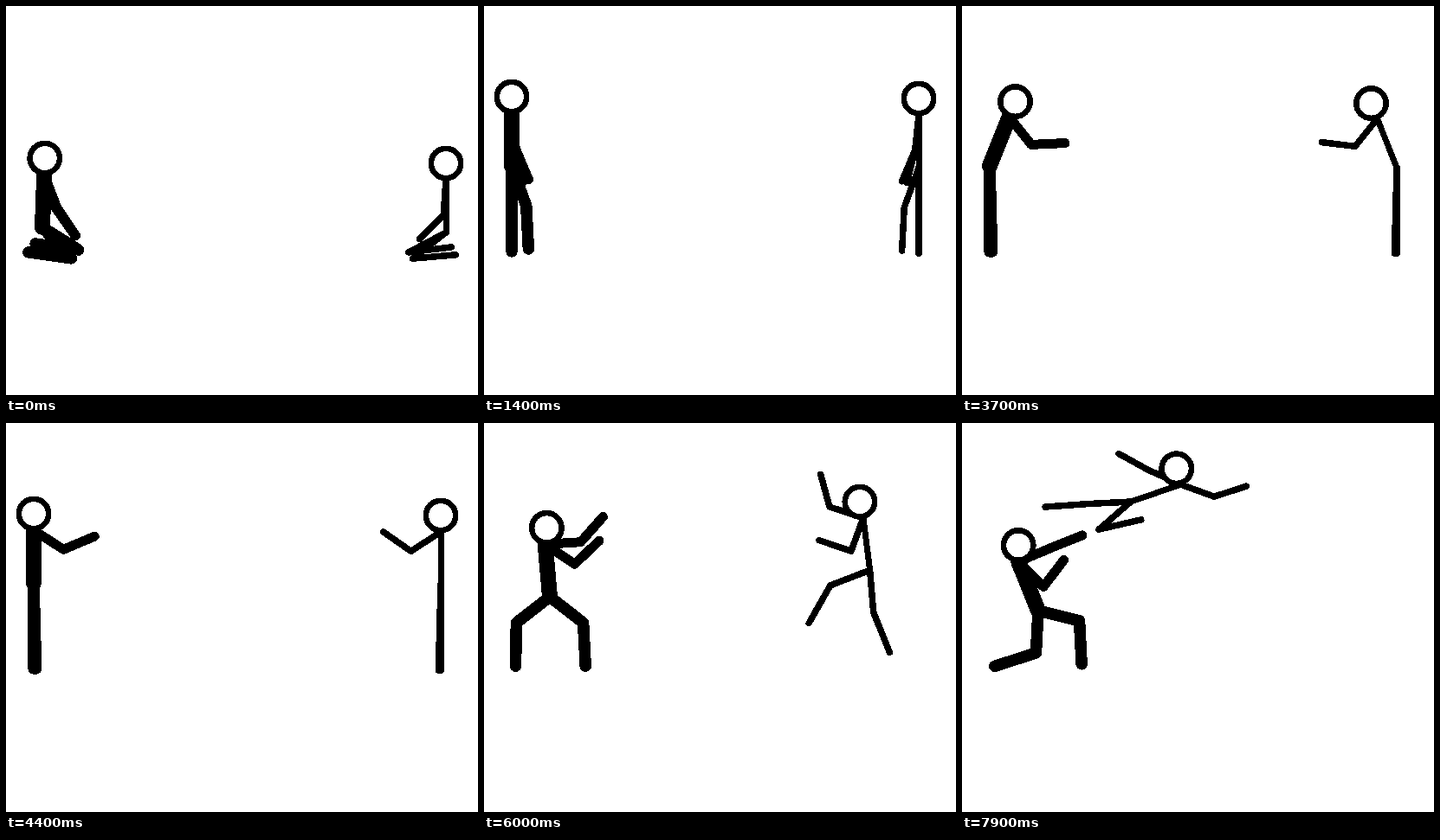
An HTML page that plays this animation: 545x450 px, repeating every 8000 ms.

```html
<!DOCTYPE html>
<html lang="en">
<head>
<meta charset="utf-8">
<title>Stick fight</title>
<style>
  html, body { margin: 0; width: 100%; height: 100%; overflow: hidden; background: #fff; }
  svg { display: block; width: 545px; height: 450px; }
  path { fill: none; stroke: #000; stroke-linecap: round; stroke-linejoin: round; }
  circle { fill: #fff; stroke: #000; stroke-width: 6.6; }
</style>
</head>
<body>
<svg id="stage" viewBox="0 0 545 450" shape-rendering="crispEdges"></svg>
<script>
const LOOP = 8000, STEP = 100;
const HEAD = 19, TORSO = 61, ARM = [41, 39], LEG = [49, 50];
const TOGETHER = [0, 0, 1.5, 1.5];

// Angles in degrees, positive towards the opponent. Limbs hang at 0;
// lean and tilt (torso and head) stand up at 0. hip is the shift from home.
function pose({ hip = [0, 0], lean = 0, tilt = lean, arms, legs = TOGETHER }) {
  const both = arms.length > 2 ? arms : [...arms, ...arms];
  return [...hip, lean, tilt, ...both, ...legs];
}

// Kneeling, rising and bowing are the same ritual for both fighters.
function ritual(kneel, reach) {
  return [
    [0, pose(kneel)],
    [900, pose({ hip: [2, 48], arms: [14, 30], legs: [6, -87, 77, -5] })],
    [1400, pose({ arms: [6, 23, 6, 14], legs: [0, 0, 20, 3] })],
    [1800, pose({ arms: [6, 18] })],
    [2300, pose(reach)],
    [2900, pose({ lean: 21, tilt: 24, arms: [45, 91] })],
    [3300, pose({ lean: 34, arms: [28, 81] })],
    [4400, pose(reach)],
    [4600, pose(reach)]
  ];
}

const stance = { hip: [44, 16], arms: [89, 126, 51, 120], legs: [-52, -1, 52, 3] };
const lunge = { hip: [56, 32], lean: -22, tilt: 0, legs: [-3, -72, 76, 3] };
const guard = { arms: [115, 168, 17, 108], legs: [0, 0, 14, -2] };

const fighters = [
  {
    home: [32, 185], dir: 1, widths: [18, 11, 13.5],
    keys: [
      ...ritual(
        { hip: [10, 71], lean: 2, arms: [19, 35, 21, 34], legs: [43, -98, 58, -98] },
        { arms: [57, 113] }),
      [4900, pose(stance)],
      [5200, pose(stance)],
      [6800, pose({ ...stance, lean: -10, tilt: 10, arms: [98, 151, 61, 147] })],
      [7700, pose({ ...lunge, arms: [-58, -29, 48, 144] })],
      [7900, pose({ ...lunge, arms: [113, 112, 45, 143] })]
    ]
  },
  {
    home: [502, 187], dir: -1, widths: [7, 7.5, 7.5],
    keys: [
      ...ritual(
        { hip: [-6, 75], arms: [4, 45], legs: [52, -95, 62, -97] },
        { arms: [57, 125] }),
      [4900, pose(guard)],
      [5000, pose(guard)],
      [5200, pose({ hip: [13, 0], lean: 9, tilt: 15, arms: [101, 166, 13, 108], legs: [-4, -10, 59, 8] })],
      [5900, pose({ hip: [42, -11], lean: 13, arms: [102, 168, 15, 106], legs: [-16, -19, 66, 22] })],
      [6400, pose({ hip: [114, -40], lean: -16, tilt: 9, arms: [132, 152, 40, 120], legs: [40, -34, 80, 60] })],
      [6800, pose({ hip: [188, -73], lean: -64, tilt: 6, arms: [108, 111, 55, 130], legs: [81, -46, 93, 90] })],
      [7900, pose({ hip: [307, -96], lean: -71, tilt: 15, arms: [114, 119, -70, -108], legs: [49, -103, 87, 86] })]
    ]
  }
];

const stage = document.getElementById('stage');

function add(tag, attrs) {
  const el = document.createElementNS('http://www.w3.org/2000/svg', tag);
  for (const name in attrs) el.setAttribute(name, attrs[name]);
  return stage.appendChild(el);
}

function sample(keys, t) {
  const i = keys.findIndex(([time]) => time > t);
  if (i < 0) return keys[keys.length - 1][1];
  const [t0, a] = keys[i - 1], [t1, b] = keys[i];
  return a.map((v, j) => v + (b[j] - v) * (t - t0) / (t1 - t0));
}

function makeFighter({ home, dir, widths: [torsoW, armW, legW], keys }) {
  const line = w => add('path', { 'stroke-width': w });
  const legs = [line(legW), line(legW)];
  const torso = line(torsoW);
  const arms = [line(armW), line(armW)];
  const head = add('circle', { r: 17.2 });

  const move = ([x, y], angle, length) => {
    const a = angle * Math.PI / 180;
    return [x + dir * Math.sin(a) * length, y + Math.cos(a) * length];
  };
  const bend = (path, root, [upper, lower], lengths) => {
    const joint = move(root, upper, lengths[0]);
    path.setAttribute('d', `M${root}L${joint}L${move(joint, lower, lengths[1])}`);
  };

  return t => {
    const [dx, dy, lean, tilt, ...limbs] = sample(keys, t);
    const hip = [home[0] + dir * dx, home[1] + dy];
    const neck = move(hip, 180 - lean, TORSO);
    const [cx, cy] = move(neck, 180 - tilt, HEAD);
    torso.setAttribute('d', `M${neck}L${hip}`);
    arms.forEach((path, i) => bend(path, neck, limbs.slice(i * 2, i * 2 + 2), ARM));
    legs.forEach((path, i) => bend(path, hip, limbs.slice(i * 2 + 4, i * 2 + 6), LEG));
    head.setAttribute('cx', cx);
    head.setAttribute('cy', cy);
  };
}

const poseAll = fighters.map(makeFighter);
const start = performance.now();

function draw() {
  const t = Math.floor((performance.now() - start) % LOOP / STEP) * STEP;
  poseAll.forEach(show => show(t));
  requestAnimationFrame(draw);
}
draw();
</script>
</body>
</html>
```
